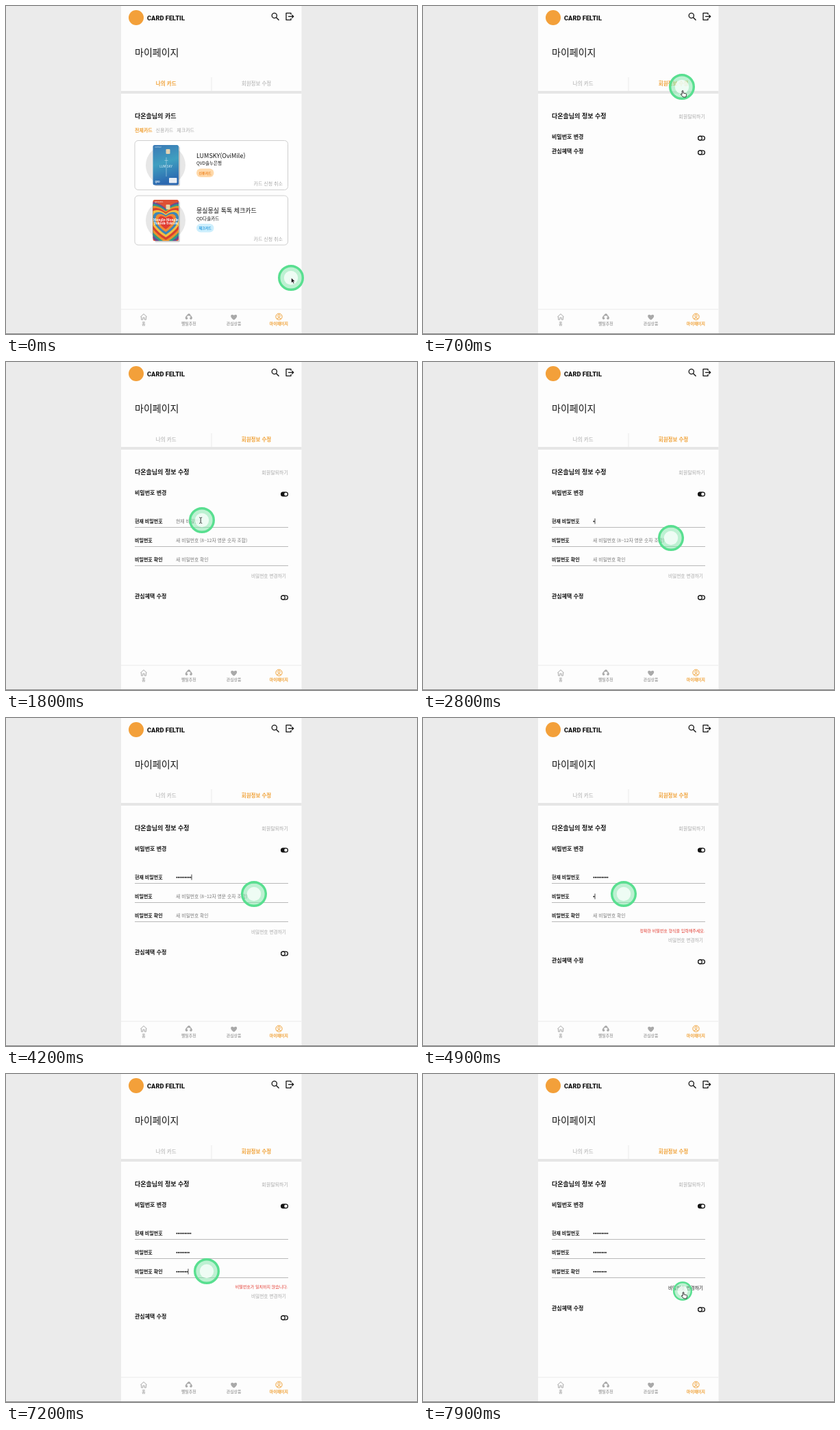
An HTML page that plays this animation: 600 px wide and 479 px high, repeating every 8 s.

```html
<!DOCTYPE html>
<html lang="ko">
<head>
<meta charset="utf-8">
<style>
html, body { margin: 0; width: 100%; height: 100%; overflow: hidden; background: #ebebeb; }
svg { display: block; width: 600px; height: 479px; }
text { font-family: "Noto Sans CJK KR", "Noto Sans CJK", "Noto Sans", sans-serif; }
</style>
</head>
<body>
<svg viewBox="0 0 600 479">
  <defs>
    <linearGradient id="sea" x2=".2" y2="1">
      <stop stop-color="#3b78b5"/><stop offset=".5" stop-color="#3f9fc0"/><stop offset="1" stop-color="#2c68b0"/>
    </linearGradient>
    <clipPath id="cardClip"><rect x="214.5" y="283" width="37.5" height="60" rx="2.5"/></clipPath>
    <path id="heart" d="M0 .9C-1.5 -.05-.85-1.15 0-.45C.85-1.15 1.5-.05 0 .9Z"/>
  </defs>
  <g id="base"></g><g id="page"></g><g id="mouse"></g>
</svg>
<script>
const ORANGE = '#f0a136', GRAY = '#a9a9a9', INK = '#151515', RED = '#e2372c';
const $ = id => document.getElementById(id);

// y is the optical middle of the line
const text = (x, y, size, str, fill = INK, weight = 400, more = '') =>
  `<text x="${x}" y="${y + size * .36}" font-size="${size}" fill="${fill}" font-weight="${weight}" ${more}>${str}</text>`;
const MID = 'text-anchor="middle"', END = 'text-anchor="end"';
const rect = (x, y, w, h, fill, more = '') =>
  `<rect x="${x}" y="${y}" width="${w}" height="${h}" fill="${fill}" ${more}/>`;
const circle = (x, y, r, fill, more = '') => `<circle cx="${x}" cy="${y}" r="${r}" fill="${fill}" ${more}/>`;
const line = (d, stroke, w = 1, fill = 'none') =>
  `<path d="${d}" stroke="${stroke}" stroke-width="${w}" fill="${fill}" stroke-linejoin="round"/>`;
const heart = (x, y, s, fill) => `<use href="#heart" transform="translate(${x} ${y}) scale(${s})" fill="${fill}"/>`;

function base() {
  const nav = ['홈', '펠틸추천', '관심상품', '마이페이지'].map((s, i) =>
    text(201 + i * 65.8, 464, 5.9, s, i == 3 ? ORANGE : GRAY, 700, MID)).join('');
  return rect(0, 0, 600, 479, '#ebebeb') + rect(168, 0, 263.5, 479, '#fdfdfd') +
    circle(190, 17, 11, '#f3a03a') +
    text(206, 17.3, 9.3, 'CARD FELTIL', INK, 900, 'style="font-family:Roboto,sans-serif"') +
    circle(391.8, 14, 3.6, 'none', `stroke="${INK}" stroke-width="1.3"`) +
    line('M394.5 16.7l4 4', INK, 1.5) +
    line('M416 12.5v-2.2h-7v10h7v-2.2M412 15.3h7.5M417.3 13l2.4 2.3-2.4 2.3', INK, 1.3) +
    text(188, 68, 14, '마이페이지', INK, 300) +
    rect(299.5, 104, 1, 20, '#ececec') + rect(168, 124, 263.5, 4, '#e6e6e6') +
    rect(168, 442.5, 263.5, 1, '#ebebeb') + nav +
    line('M196.3 454l4.7-4.3 4.7 4.3M197.6 453.5v4.6h2.2v-3h2.4v3h2.2v-4.6', GRAY) +
    line('M262.3 456q1.2-4.5 4.5-4.5t4.5 4.5M265 451l2-1 2 1', GRAY, 1.5) +
    circle(263.6, 456, 1.8, GRAY) + circle(270, 456, 1.8, GRAY) +
    heart(332.7, 454, 5, GRAY) +
    circle(398.5, 453.7, 4.6, 'none', `stroke="${ORANGE}"`) +
    circle(398.5, 452.4, 1.7, 'none', `stroke="${ORANGE}"`) +
    line('M395.3 456.8q3.2-3 6.4 0', ORANGE) +
    rect(0, 478, 600, 1, '#8c8c8c');
}

function cardRow(y, name, bank, kind, pill, ink, art) {
  return rect(188, y, 223.5, 72, '#fff', 'rx="5" stroke="#cfcfcf"') +
    circle(233, y + 36, 29, '#e7e7e7') + art +
    text(278, y + 22, 9, name, INK, 500) + text(278, y + 33.5, 6.5, bank, INK) +
    rect(278, y + 41, 25.5, 12.5, pill, 'rx="6.2"') + text(290.7, y + 47.3, 5, kind, ink, 700, MID) +
    text(404, y + 63, 7, '카드 신청 취소', GRAY, 400, END);
}

function cards() {
  const shadow = 'rx="2.5" opacity=".18"';
  const air = rect(217, 205, 37, 58, '#000', shadow) + rect(214.5, 203, 37.5, 58.5, 'url(#sea)', 'rx="2.5"') +
    rect(233.5, 209, 6, 7, '#e5d3b1', 'rx="1"') + line('M234 221v28M231.5 225.5h5', '#b9dcea', .6) +
    text(233.5, 234, 4.6, 'LUM SKY', '#e4f3f8', 400, MID) +
    text(217, 206, 2.6, 'OVIMILE', '#d8ecf4') + text(217.5, 257, 3.4, 'QVD', '#fff', 700) +
    rect(238, 251, 11.5, 7.5, '#e9eef5', 'rx=".8"');
  const rings = ['#6a4a94', '#2f9b86', '#e8912d', '#d8402f', '#f3bd42', '#3c86b8', '#ef8a34', '#e03c33']
    .map((c, i) => heart(233.3, 315, 43 - i * 4.4, c)).join('');
  const love = rect(217, 285, 37, 60, '#000', shadow) +
    `<g clip-path="url(#cardClip)">${rect(214, 283, 39, 60, '#dd5134')}${rings}</g>` +
    rect(233.5, 290, 6, 7, '#e8d4a5', 'rx="1"') +
    ['Mongle-Mongle', 'Toktok-Toktok'].map((s, i) =>
      text(233.3, 312 + i * 5, 4.8, s, '#fff', 700, MID + ' style="font-family:\'Noto Serif\',serif"')).join('') +
    text(217, 286, 2.6, 'QD DASOL', '#fff');
  return text(188, 161, 9, '다온솔님의 카드', INK, 700) +
    text(188, 181, 7, '전체카드', ORANGE, 700) + text(218.5, 181, 7, '신용카드', GRAY, 500) +
    text(249.3, 181, 7, '체크카드', GRAY, 500) +
    cardRow(196.5, 'LUMSKY(OviMile)', 'QVD솔누은행', '신용카드', '#ffd9aa', '#ee8420', air) +
    cardRow(277, '몽실몽실 톡톡 체크카드', 'QD다솔카드', '체크카드', '#cdeffd', '#2196dc', love);
}

function toggle(y, on) {
  return rect(401.6, y - 2.9, 9.8, 5.8, on ? INK : '#fff', `rx="2.9" stroke="${INK}" stroke-width="1.3"`) +
    circle(on ? 408.5 : 404.5, y, on ? 2.3 : 2.8, '#fff', on ? '' : `stroke="${INK}" stroke-width="1.2"`);
}

// times at which each typed dot appears
const typed = [
  [2800, 3000, 3200, 3300, 3500, 3700, 3800, 4000, 4200],
  [4900, 5100, 5200, 5300, 5400, 5500, 5600, 5700],
  [6400, 6600, 6700, 6800, 7000, 7100, 7200, 7400]
];
const focus = [[2000, 4700], [4700, 6200], [6200, 7900]];
const labels = ['현재 비밀번호', '비밀번호', '비밀번호 확인'];
const hints = ['현재 비밀번호', '새 비밀번호 (8~12자 영문 숫자 조합)', '새 비밀번호 확인'];

function field(i, t) {
  const y = 232 + i * 28, n = typed[i].filter(k => k <= t).length;
  let s = text(188, y, 7, labels[i], INK, 700) + rect(188, y + 9, 224, 1, '#b9b9b9');
  if (!n) s += text(248, y + .5, 6.8, hints[i], '#777');
  for (let k = 0; k < n; k++) s += circle(249.4 + k * 2.5, y + .8, 1.05, INK);
  if (t >= focus[i][0] && t < focus[i][1]) s += rect(248.1 + n * 2.5, y - 3.5, .8, 8, INK);
  return s;
}

function settings(t) {
  const open = t >= 1400, valid = t >= 7400;
  const error = t < 4900 || valid ? '' : t < 5700 ? '정확한 비밀번호 형식을 입력해주세요.' : '비밀번호가 일치하지 않습니다.';
  const shift = error ? 12 : 0, y = open ? 342 + shift : 212;
  let s = text(188, 161, 9, '다온솔님의 정보 수정', INK, 700) +
    text(412, 161, 7, '회원탈퇴하기', GRAY, 500, END) +
    text(188, 191, 8, '비밀번호 변경', INK, 700) + toggle(193, open) +
    text(188, y, 8, '관심혜택 수정', INK, 700) + toggle(y + 2, false);
  if (open) s += [0, 1, 2].map(i => field(i, t)).join('') +
    text(411.5, 311, 6, error, RED, 500, END) +
    text(409, 312.5 + shift, 6.7, '비밀번호 변경하기', valid ? INK : GRAY, valid ? 500 : 400, END);
  return s;
}

function page(t) {
  const edit = t >= 600;
  const tab = (x, s, on) => text(x, 113.3, 7.5, s, on ? ORANGE : GRAY, on ? 700 : 400, MID);
  return tab(233.7, '나의 카드', !edit) + tab(365.5, '회원정보 수정', edit) + (edit ? settings(t) : cards());
}

// time, x, y
const path = [
  [0, 416, 397], [500, 379, 116], [700, 378, 118], [900, 378, 118], [1200, 408, 193], [1400, 408, 193],
  [1800, 286, 231], [2000, 286, 231], [2300, 382, 253], [2700, 368, 257], [2800, 362, 257],
  [4200, 362, 257], [4600, 293, 257], [5700, 293, 257], [6000, 293, 288], [7400, 293, 288],
  [7800, 379, 317], [8000, 379, 317]
];
const clicks = [500, 1300, 1900, 4600, 6100, 7900];
const pointers = [
  [0, 'arrow'], [500, 'hand'], [1000, 'arrow'], [1200, 'hand'], [1500, 'arrow'], [1700, 'beam'], [2200, 'arrow'],
  [2400, 'beam'], [2800, ''], [4300, 'beam'], [4900, ''], [5800, 'beam'], [6400, ''], [7500, 'arrow'], [7700, 'hand']
];
const shapes = {
  '': '',
  arrow: line('M.5 0v7.4l1.8-1.6 1.3 2.8 1.3-.6-1.3-2.7h2.3Z', '#fff', .6, '#000'),
  beam: line('M-3.8-4q1.5 0 2 1 .5-1 2-1M-1.8-3v6.5M-3.8 4.5q1.5 0 2-1 .5 1 2 1', '#222', .9),
  hand: line('M.2 1q1-1.2 1.7 0v3l4 1q1 .3.7 1.5l-.8 3.5h-4l-3.6-4q.3-1.3 2 0Z', '#222', .9, '#fff')
};

function mouse(t) {
  const i = path.findIndex(p => p[0] > t), a = path[i - 1], b = path[i];
  const u = (t - a[0]) / (b[0] - a[0]), e = u * u * (3 - 2 * u);
  const x = a[1] + (b[1] - a[1]) * e, y = a[2] + (b[2] - a[2]) * e;
  const kind = pointers.filter(p => p[0] <= t).pop()[1];
  const dy = kind == 'hand' ? (t < 7000 ? 5 : 1) : 0;
  return `<g transform="translate(${x} ${y})"><g transform="scale(${clicks.includes(t) ? .74 : 1})">` +
    circle(0, 0, 17.3, '#7fe5a8', 'fill-opacity=".5" stroke="#59df90" stroke-width="3.4"') +
    circle(0, 0, 10.2, '#fff', 'opacity=".75"') +
    `</g><g transform="translate(0 ${dy})">${shapes[kind]}</g></g>`;
}

$('base').innerHTML = base();
let last = -1;
function frame() {
  const t = Math.floor(performance.now() % 8000 / 100) * 100;
  if (t != last) {
    $('page').innerHTML = page(t);
    $('mouse').innerHTML = mouse(t);
    last = t;
  }
  requestAnimationFrame(frame);
}
frame();
</script>
</body>
</html>
```
